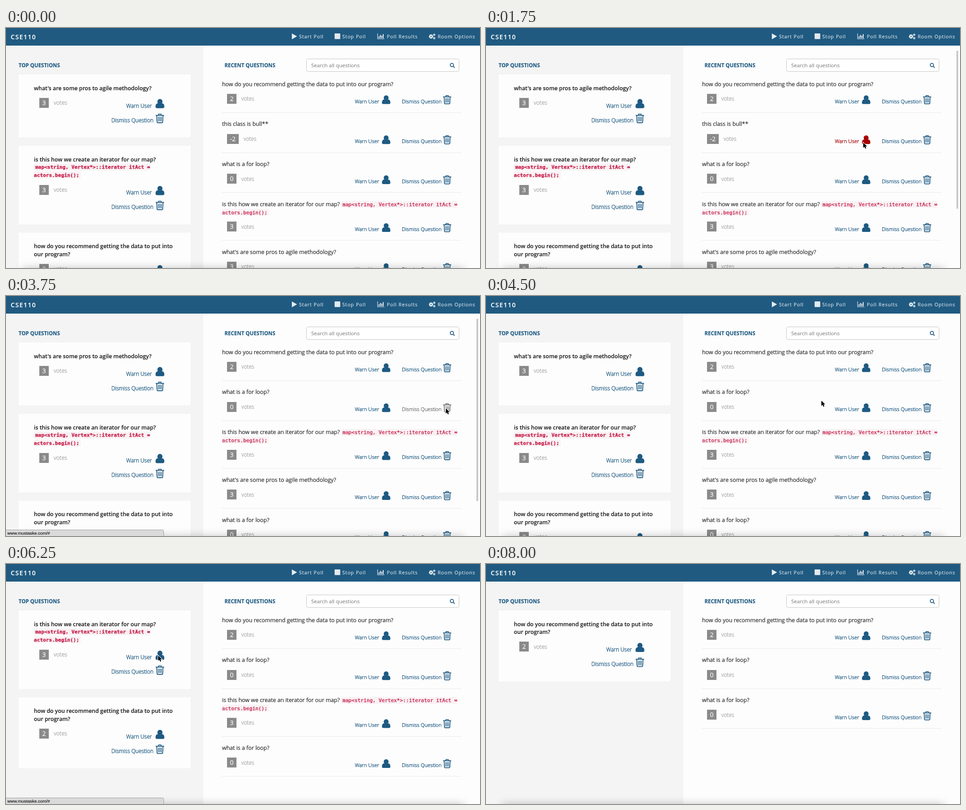
Write an HTML page with a canvas that moves like this. It is 1053 px wide and 532 px high and loops after 8.25 s.

```html
<!DOCTYPE html>
<html lang="en">
<head>
<meta charset="utf-8">
<title>Question board</title>
<style>
html, body { margin: 0; width: 100%; height: 100%; overflow: hidden; background: #fdfdfd; }
canvas { display: block; }
</style>
</head>
<body>
<canvas id="stage" width="1053" height="532"></canvas>
<script>
const ctx = document.getElementById('stage').getContext('2d');
const LOOP = 8250, STEP = 250;
const BLUE = '#1e5a82', RED = '#a80000', WARNED = '#a94442', GREY = '#727272', INK = '#222', NAV = '#e3ebf0';
const SANS = '"Open Sans", sans-serif', MONO = '"DejaVu Sans Mono", monospace';
const LINE = 17.4;

const data = { lines: ['how do you recommend getting the data to put into', 'our program?'], votes: 2 };
const bull = { lines: ['this class is bull**'], votes: -2 };
const loop = { lines: ['what is a for loop?'], votes: 0 };
const iterator = {
  lines: ['is this how we create an iterator for our map?'],
  code: ['map<string, Vertex*>::iterator itAct =', 'actors.begin();'], votes: 3
};
const agile = { lines: ["what's are some pros to agile methodology?"], votes: 3 };

// [start ms, x, y]; the pointer holds each place until the next one
const pointer = [
  [0], [500, 1018, 18], [750, 960, 150], [1000, 890, 240], [1250, 862, 272], [1750, 838, 254],
  [2500, 915, 252], [2750, 967, 249], [3000, 977, 249], [4250, 905, 243], [4500, 745, 232],
  [4750, 560, 220], [5000, 400, 209], [5250, 338, 203], [6750, 338, 228], [7000, 338, 238], [7750]
];

const between = (t, from, to) => t >= from && t < to;

// thin faces get a slight outline so that they look as dark as smoothed screen text
function text(str, x, y, font, color, spacing = 0) {
  ctx.font = font;
  ctx.fillStyle = ctx.strokeStyle = color;
  ctx.lineWidth = /^300|Mono/.test(font) ? 0.4 : 0.15;
  ctx.letterSpacing = spacing + 'px';
  ctx.fillText(str, x, y);
  ctx.strokeText(str, x, y);
  const width = ctx.measureText(str).width;
  ctx.letterSpacing = '0px';
  return width;
}

function box(x, y, w, h, fill, radius = 0) {
  ctx.fillStyle = fill;
  ctx.beginPath();
  ctx.roundRect(x, y, w, h, radius);
  ctx.fill();
}

function path(color, width, build) {
  ctx.beginPath();
  build();
  if (width) {
    ctx.strokeStyle = color;
    ctx.lineWidth = width;
    ctx.stroke();
  } else {
    ctx.fillStyle = color;
    ctx.fill();
  }
}

function segments(color, width, list) {
  path(color, width, () => list.forEach(([x1, y1, x2, y2]) => {
    ctx.moveTo(x1, y1);
    ctx.lineTo(x2, y2);
  }));
}

function placed(x, y, scale, draw) {
  ctx.save();
  ctx.translate(x, y);
  ctx.scale(scale, scale);
  draw();
  ctx.restore();
}

function userIcon(x, y, scale, color) {
  placed(x, y, scale, () => {
    path(color, 0, () => ctx.ellipse(9.5, 5.6, 5.4, 5.6, 0, 0, 7));
    path(color, 0, () => {
      ctx.moveTo(5, 9.3);
      ctx.bezierCurveTo(1.4, 9.3, 0.2, 12.8, 0.2, 16.2);
      ctx.quadraticCurveTo(0.2, 19.4, 3.4, 19.4);
      ctx.lineTo(15.6, 19.4);
      ctx.quadraticCurveTo(18.8, 19.4, 18.8, 16.2);
      ctx.bezierCurveTo(18.8, 12.8, 17.6, 9.3, 14, 9.3);
      ctx.closePath();
    });
  });
}

function trashIcon(x, y, scale, color) {
  placed(x, y, scale, () => {
    segments(color, 1.8, [[0, 3.6, 18, 3.6]]);
    path(color, 1.6, () => {
      ctx.moveTo(5.6, 3.4);
      ctx.lineTo(6.4, 0.9);
      ctx.lineTo(11.6, 0.9);
      ctx.lineTo(12.4, 3.4);
    });
    path(color, 1.8, () => {
      ctx.moveTo(2.4, 3.6);
      ctx.lineTo(3, 17.6);
      ctx.quadraticCurveTo(3.1, 19.2, 4.6, 19.2);
      ctx.lineTo(13.4, 19.2);
      ctx.quadraticCurveTo(14.9, 19.2, 15, 17.6);
      ctx.lineTo(15.6, 3.6);
    });
    segments(color, 1.5, [6, 9, 12].map(px => [px, 6.6, px, 16.4]));
  });
}

function gear(x, y, r) {
  path(NAV, r * 0.75, () => ctx.arc(x, y, r * 0.72, 0, 7));
  for (let i = 0; i < 8; i++) {
    const a = i * Math.PI / 4, c = Math.cos(a), s = Math.sin(a);
    segments(NAV, r * 0.42, [[x + c * r * 0.8, y + s * r * 0.8, x + c * r * 1.3, y + s * r * 1.3]]);
  }
}

function navBar() {
  box(0, 0, 1053, 39, '#205a81');
  text('CSE110', 10.5, 24.7, '600 14px ' + SANS, '#fff', 1.4);
  [['Start Poll', 651], ['Stop Poll', 747], ['Poll Results', 846], ['Room Options', 959]]
    .forEach(([label, x]) => text(label, x, 23, '10.7px ' + SANS, NAV, 1));
  path(NAV, 0, () => {
    ctx.moveTo(635, 12);
    ctx.lineTo(646.5, 18.5);
    ctx.lineTo(635, 25);
  });
  box(730, 12, 12.5, 12.5, NAV, 1);
  segments(NAV, 1.2, [[825.5, 12, 825.5, 24.5], [825, 24, 840.5, 24]]);
  [4, 7, 5.5, 9].forEach((h, i) => box(827.7 + i * 3.1, 22.4 - h, 2, h, NAV));
  gear(944.2, 18.8, 3.8);
  gear(951.3, 15, 2);
  gear(951.3, 22.4, 2);
}

function badge(votes, x, y, size) {
  const font = '14px ' + SANS;
  ctx.font = font;
  const w = Math.round(ctx.measureText(votes).width + 13);
  box(x, Math.round(y) - 11, w, 22, '#8a8a8a');
  text(String(votes), x + 6.5, Math.round(y) + 5, font, '#fff');
  text('votes', x + w + 11, y + 4.2, `300 ${size}px ${SANS}`, '#a8a8a8');
}

function codeLine(str, x, y, weight, padLeft, padRight) {
  const font = `${weight} 11.17px ${MONO}`;
  ctx.font = font;
  const w = ctx.measureText(str).width;
  box(x - padLeft, y - 7.5, w + padLeft + padRight, 15, '#f9f1f4', 3);
  text(str, x, y + 4, font, '#c7254e');
}

function card(q, y, dismissColor) {
  const count = q.lines.length + (q.code ? q.code.length : 0);
  const height = 139.5 + LINE * (count - 1);
  box(28, y, 382, height, '#fdfdfd');
  let line = y + 30;
  for (const str of q.lines) {
    text(str, 62, line + 4.5, '600 12.35px ' + SANS, INK);
    line += LINE;
  }
  if (q.code) {
    codeLine(q.code[0], 65, line, 'bold', 3, 0);
    codeLine(q.code[1], 62, line + LINE, 'bold', 0, 3);
    line += 2 * LINE;
  }
  line -= LINE;
  badge(q.votes, 74, line + 33, 12.5);
  text('Warn User', 267, line + 43.5, '300 12px ' + SANS, BLUE);
  userIcon(332, line + 24.3, 1.05, BLUE);
  text('Dismiss Question', 234, line + 75.5, '300 12px ' + SANS, dismissColor);
  trashIcon(332.5, line + 57, 1.04, dismissColor);
  return y + height + 18.5;
}

function row(q, y, look) {
  const w = text(q.lines.join(' '), 480, y + 4.5, '12.39px ' + SANS, INK);
  if (q.code) {
    codeLine(q.code[0], 480 + w + 6, y + 1, 'normal', 3, 0);
    y += LINE;
    codeLine(q.code[1], 480, y + 1, 'normal', 0, 3);
  }
  badge(q.votes, 491, y + 33, 11.8);
  text('Warn User', 775, y + 42.5, '300 11.3px ' + SANS, look.warnText);
  if (look.underline) box(775, Math.round(y + 44), 56, 1, look.warnText);
  userIcon(835, y + 25.2, 1, look.warnIcon);
  text('Dismiss Question', 879.5, y + 42.5, '300 11.3px ' + SANS, look.dismiss);
  trashIcon(971, y + 25, 1, look.dismiss);
  box(480, Math.round(y + 63), 532, 1, '#e9e9e9');
  return y + 88.7;
}

function searchField() {
  box(667.5, 68.5, 339, 28, '#fff', 4);
  path('#c4c4c4', 1, () => ctx.roundRect(667.5, 68.5, 339, 28, 4));
  text('Search all questions', 678, 87, '11.6px ' + SANS, '#858585');
  path(BLUE, 1.7, () => ctx.arc(990.6, 82, 3.6, 0, 7));
  segments(BLUE, 2, [[993.2, 84.6, 996.4, 87.8]]);
}

function statusBar(alpha) {
  ctx.globalAlpha = alpha;
  box(-4, 518.5, 354.5, 20, '#dadada', 3);
  path('#a2a2a2', 1, () => ctx.roundRect(-4, 518.5, 354.5, 20, 3));
  ctx.globalAlpha = 1;
  text('www.mustaske.com/#', 3, 528.5, '9.8px "Liberation Sans", sans-serif', '#111');
}

function bottomShadow() {
  ctx.save();
  ctx.shadowColor = 'rgba(0,0,0,0.28)';
  ctx.shadowBlur = 20;
  box(36, 534, 981, 30, '#000');
  ctx.restore();
}

function arrow(x, y) {
  placed(x, y, 1, () => {
    const outline = () => {
      ctx.moveTo(0, 0);
      [[0, 11.6], [2.7, 9.2], [4.6, 13.4], [6.7, 12.5], [4.9, 8.4], [8.4, 8.2]]
        .forEach(p => ctx.lineTo(...p));
      ctx.closePath();
    };
    path('#fff', 2, outline);
    path('#000', 0, outline);
  });
}

function draw(t) {
  const top = [agile, iterator, data];
  if (t >= 6250) top.shift();
  if (t >= 7500) top.shift();
  const recent = [data, bull, loop, iterator, agile, loop].filter(q =>
    !(q === bull && t >= 3750) && !(q === agile && t >= 6250) && !(q === iterator && t >= 7500));

  box(0, 0, 1053, 532, '#fdfdfd');
  box(0, 39, 438, 493, '#f4f4f4');
  text('TOP QUESTIONS', 28, 87, 'bold 11.5px ' + SANS, BLUE);
  text('RECENT QUESTIONS', 485.5, 87, 'bold 11.5px ' + SANS, BLUE);
  searchField();

  const topHover = between(t, 5250, 6250) || between(t, 7000, 7500);
  let y = 103;
  top.forEach((q, i) => { y = card(q, y, topHover && i === 0 ? GREY : BLUE); });

  y = 124;
  recent.forEach((q, i) => {
    const look = { warnText: BLUE, warnIcon: BLUE, dismiss: BLUE };
    if (q === bull && t >= 1750) {
      look.warnText = t < 2500 ? RED : BLUE;
      look.warnIcon = t < 2500 ? RED : WARNED;
      look.underline = t >= 2000;
    }
    if (i === 1 && between(t, 2750, 4250)) look.dismiss = GREY;
    y = row(q, y, look);
  });

  if (between(t, 1750, 4500)) box(1045, 50, 4, t < 3750 ? 351 : 405, '#c9c9c9', 2);
  if (between(t, 5000, 6250)) box(430, 50, 4, 396, '#b9b9b9', 2);
  navBar();

  bottomShadow();
  if (between(t, 2500, 4250) || between(t, 5500, 8000)) statusBar(t < 3000 ? 0.8 : 1);

  const [, px, py] = pointer.findLast(p => p[0] <= t);
  if (px) arrow(px, py);
}

let start, shown;
function tick(now) {
  start ??= now;
  const t = Math.floor((now - start) % LOOP / STEP) * STEP;
  if (t !== shown) draw(shown = t);
  requestAnimationFrame(tick);
}
draw(0);
requestAnimationFrame(tick);
</script>
</body>
</html>
```
